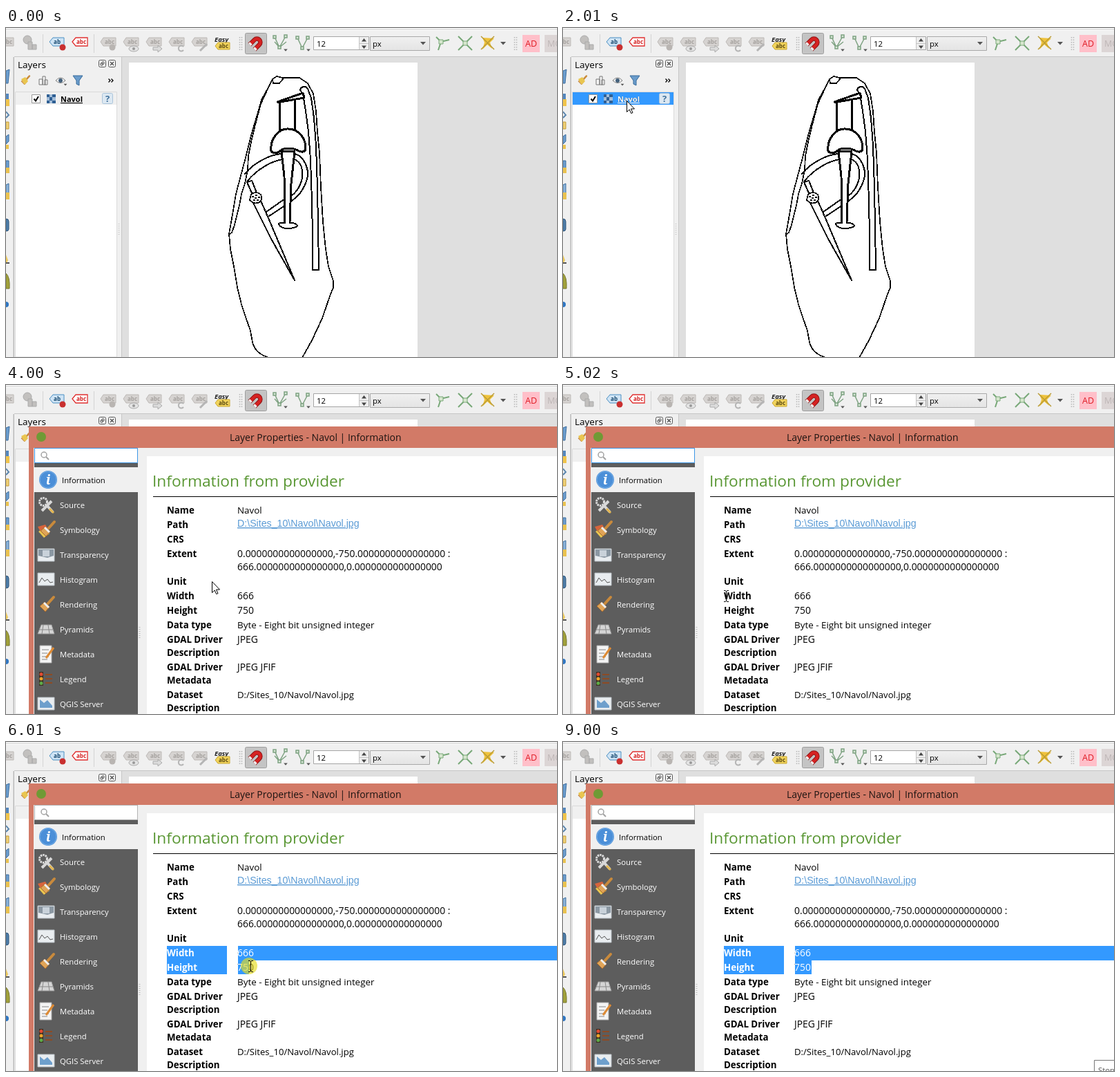
An HTML page that plays this animation: 798 px wide and 476 px high, repeating every 10000 ms.

```html
<!DOCTYPE html>
<html lang="en">
<head>
<meta charset="utf-8">
<title>Layer properties</title>
<style>
html, body { margin: 0; width: 100%; height: 100%; overflow: hidden; background: #f0f0f0; }
svg { display: block; width: 798px; height: 476px; }
text { font-family: "Open Sans", "Noto Sans", sans-serif; white-space: pre; }
.ui { font-size: 11.3px; }
.val { font-size: 13.4px; }
.num { font-size: 13.9px; }
.path { font-size: 13.1px; }
.key { font-size: 13.3px; font-weight: 700; }
.link { font: 14.2px "Liberation Sans", Arial, sans-serif; fill: #5b9bd5; text-decoration: underline; }
.tag { font: 700 8px "Open Sans", sans-serif; text-anchor: middle; }
.name { font-size: 11px; font-weight: 700; text-decoration: underline; }
.line { fill: none; stroke: #000; stroke-width: 1.7; stroke-linejoin: round; stroke-linecap: round; }
.mid { stroke-width: 2; }
.bold { stroke-width: 3; }

.step { opacity: 0; animation: 10s step-end infinite; }
#arrow { animation-name: arrow; }
#beam { animation-name: beam; }
#halo { animation-name: halo; }
#caret { animation-name: caret; }
.row { animation-name: row; }
#dialog { animation-name: dialog; }
#focus { animation-name: focus; }
#pick1 { animation-name: pick1; }
#pick2 { animation-name: pick2; }
#pick3 { animation-name: pick3; }
#tip { animation-name: tip; }

@keyframes arrow {
  0%, 25%, 50.2%, 75%, 100% { opacity: 0; transform: translate(0, 0); }
  5% { opacity: 1; transform: translate(159px, 150px); }
  10% { opacity: 1; transform: translate(93px, 105px); }
  14.9% { opacity: 1; transform: translate(92px, 105px); }
  35% { opacity: 1; transform: translate(130px, 137px); }
  40% { opacity: 1; transform: translate(298px, 284px); }
  45% { opacity: 1; transform: translate(231px, 306px); }
  70% { opacity: 1; transform: translate(451px, 407px); }
}
@keyframes beam {
  0%, 35%, 70%, 100% { opacity: 0; transform: translate(0, 0); }
  25% { opacity: 1; transform: translate(94px, 105px); }
  50.2% { opacity: 1; transform: translate(236px, 305px); }
  55.1% { opacity: 1; transform: translate(266px, 306px); }
  60.1% { opacity: 1; transform: translate(354px, 324px); }
  65% { opacity: 1; transform: translate(369px, 328px); }
}
@keyframes halo {
  0%, 20.1%, 70%, 100% { opacity: 0; transform: translate(0, 0); }
  14.9% { opacity: .65; transform: translate(92px, 105px); }
  55.1% { opacity: .65; transform: translate(263px, 305px); }
  60.1% { opacity: .65; transform: translate(352px, 324px); }
  65% { opacity: .65; transform: translate(369px, 328px); }
}
@keyframes caret { 0%, 30%, 40%, 50.2%, 100% { opacity: 0; } 25%, 35%, 45% { opacity: 1; } }
@keyframes row { 0%, 25%, 100% { opacity: 0; } 14.9% { opacity: 1; } }
@keyframes dialog { 0% { opacity: 0; } 25%, 100% { opacity: 1; } }
@keyframes focus { 0%, 55.1%, 100% { opacity: 0; } 25% { opacity: 1; } }
@keyframes pick1 { 0%, 60.1%, 100% { opacity: 0; } 55.1% { opacity: 1; } }
@keyframes pick2 { 0%, 65%, 100% { opacity: 0; } 60.1% { opacity: 1; } }
@keyframes pick3 { 0% { opacity: 0; } 65%, 100% { opacity: 1; } }
@keyframes tip { 0% { opacity: 0; } 90%, 100% { opacity: 1; } }
</style>
</head>
<body>
<svg viewBox="0 0 798 476" xmlns="http://www.w3.org/2000/svg">
  <defs>
    <linearGradient id="sheen" x2="0" y2="1">
      <stop stop-color="#f0f0f0"/><stop offset="1" stop-color="#e4e4e4"/>
    </linearGradient>
    <g id="label">
      <path d="M-11 0L-7-6H11V6H-7Z" fill="#d6d3d1" stroke="#bdb9b6"/>
      <text class="tag" x="2" y="3" fill="#a5a19e">abc</text>
    </g>
    <path id="grip" d="M-1.5 13V33M1.5 13V33" stroke="#b5b5b5" stroke-width="1.5" stroke-dasharray="1.5 2"/>
    <path id="down" d="M-4-2H4L0 2.5Z" fill="#555"/>
    <g id="size">
      <text class="key" x="233" y="310">Width</text>
      <text class="num" x="335" y="310">666</text>
      <text class="key" x="233" y="331">Height</text>
      <text class="num" x="335" y="331">750</text>
    </g>
    <g id="picked" fill="#fff">
      <path d="M233 295H798V336H233Z" fill="#3399ff"/>
      <use href="#size"/>
    </g>
    <g id="brush">
      <path d="M10-11L1-1" stroke="#c98a3c" stroke-width="4" stroke-linecap="round"/>
      <path d="M-3-4L4 3L-2 10L-10 2Z" fill="#e0a458" stroke="#a8682a"/>
      <path d="M-4-3L3 4" stroke="#eee" stroke-width="3"/>
    </g>
    <path id="picture" d="M-12-9H12V9H-12Z" fill="#e9edf0" stroke="#b9c0c6"/>
    <clipPath id="clip1"><path d="M233 295H267V315H233Z"/></clipPath>
    <clipPath id="clip2"><path d="M233 295H320V336H233ZM336 295H798V316H336ZM336 316H352V336H336Z"/></clipPath>
    <clipPath id="clip3"><path d="M233 295H320V336H233ZM336 295H798V316H336ZM336 316H360V336H336Z"/></clipPath>
  </defs>

  <!-- main window -->
  <path d="M0 0H798V476H0Z" fill="#f0f0f0"/>
  <path d="M0 2.5H798" stroke="#d9d9d9"/>
  <path d="M0 3.5H798" stroke="#fff"/>
  <path d="M167 42H798V476H167Z" fill="#dfdfdf"/>
  <path d="M12 41.5H798M167.5 42V476" stroke="#c6c6c6" fill="none"/>
  <path d="M178 50H596V476H178Z" fill="#fff"/>

  <!-- toolbar -->
  <use href="#label" x="0" y="20"/>
  <g fill="#c2c0be" stroke="#aaa">
    <circle cx="31" cy="17" r="6"/><path d="M32 20H38V31H32ZM38 24H44V31H38Z"/>
  </g>
  <path d="M53.5 9V36M127.5 9V36" stroke="#d4d4d4"/>
  <path d="M63 20L68 14H84V26H68Z" fill="#cfe4f5" stroke="#4a8fc2"/>
  <text class="tag" x="74" y="23" fill="#16486f">ab</text>
  <circle cx="82" cy="28" r="4.5" fill="#c93030"/>
  <path d="M96 20L101 14H118V26H101Z" fill="#fff" stroke="#e03030" stroke-width="1.3"/>
  <text class="tag" x="109" y="23" fill="#d42020">abc</text>
  <use href="#label" x="148" y="20"/><circle cx="154" cy="28" r="4.5" fill="#b9b5b2"/>
  <use href="#label" x="181" y="20"/><ellipse cx="185" cy="30" rx="7" ry="4" fill="#e3e3e3" stroke="#aaa"/><circle cx="185" cy="30" r="2" fill="#999"/>
  <use href="#label" x="214" y="20"/><path d="M213 28H220V25L226 30L220 35V32H213Z" fill="#ddd" stroke="#aaa"/>
  <use href="#label" x="247" y="20"/><path d="M257 27A4 4 0 1 0 257 32" fill="none" stroke="#b5b5b5" stroke-width="2"/>
  <use href="#label" x="280" y="20"/><path d="M281 33L291 23" stroke="#b5b5b5" stroke-width="3"/>
  <text x="302" y="20" font-size="9.5" font-weight="700" font-style="italic" fill="#222">Easy</text>
  <path d="M303 26L307 21H324V31H307Z" fill="#f2d45c" stroke="#c9a72e"/>
  <text class="tag" x="315" y="29" fill="#5c4a10">abc</text>
  <use href="#grip" x="340"/>
  <rect x="346.5" y="7.5" width="31" height="30" rx="2" fill="#c4c4c4" stroke="#9d9d9d"/>
  <g transform="translate(362 22) rotate(225)" fill="none">
    <path d="M-5-8V2A5 5 0 0 0 5 2V-8" stroke="#8f1616" stroke-width="6.5"/>
    <path d="M-5-7V2A5 5 0 0 0 5 2V-7" stroke="#d62222" stroke-width="4.5"/>
    <path d="M-5-8V-5M5-8V-5" stroke="#eee" stroke-width="5"/>
  </g>
  <g fill="none" stroke="#7fa383" stroke-width="1.5">
    <path d="M389 13L396 28L405 12M389 20L396 28L406 20M422 14L429 29L437 14"/>
    <path d="M387 11H391V15H387ZM394 26H398V30H394ZM403 10H407V14H403ZM420 12H424V16H420ZM427 27H431V31H427ZM435 12H439V16H435Z" fill="#d8e7d7"/>
  </g>
  <use href="#down" transform="translate(405 32) scale(.7)"/>
  <use href="#down" transform="translate(438 32) scale(.7)"/>
  <path d="M445.5 12.5H525.5V31.5H445.5Z" fill="#fff" stroke="#a5a5a5"/>
  <path d="M512 13H525V31H512Z" fill="#eee"/>
  <path d="M511.5 13V31M512 22.5H525" stroke="#c4c4c4"/>
  <path d="M515 19.5L518.5 15L522 19.5ZM515 25.5L518.5 30L522 25.5Z" fill="#444"/>
  <text class="ui" x="450" y="27">12</text>
  <path d="M527.5 12.5H613.5V32.5H527.5Z" fill="url(#sheen)" stroke="#a8a8a8"/>
  <text class="ui" x="531" y="27">px</text>
  <use href="#down" x="604" y="22"/>
  <g fill="none" stroke="#78a878" stroke-width="2">
    <path d="M623 13L630 20L642 17M630 20L626 32"/>
    <path d="M655 12L675 32M675 12L655 32"/>
  </g>
  <path d="M627 17H633V23H627ZM662 19H668V25H662Z" fill="#d6e6cd" stroke="#78a878"/>
  <path d="M690 14L707 15L701 21L704 30L697 24L690 31L693 21Z" fill="#efc23b"/>
  <path d="M688 12L707 31M707 12L688 31" stroke="#b99b35" stroke-width="1.5"/>
  <use href="#down" x="720" y="22"/>
  <use href="#grip" x="738"/>
  <path d="M748 10H773V35H748Z" fill="#ffbfc9"/>
  <text x="760.5" y="27" font-size="12.5" text-anchor="middle" fill="#e01b24">AD</text>
  <path d="M780 10H798V35H780Z" fill="#dcd5d5"/>
  <text x="784" y="27" font-size="12.5" fill="#bdb5b5">MC</text>

  <!-- clipped tool strip -->
  <path d="M0 62L5 60L3 80H0Z" fill="#6d9fd0" stroke="#3b6c9e"/>
  <path d="M0 95H4V113H0Z" fill="#5487bd"/><path d="M0 103H5V113H0Z" fill="#f0c44c"/>
  <path d="M0 121L4 126L0 130" fill="none" stroke="#5b86ae" stroke-width="2"/>
  <path d="M0 136H4V146H0Z" fill="#f0d27a" stroke="#c59b35"/>
  <path d="M0 157L4 154V164L0 168Z" fill="#6e9fd0" stroke="#3b6c9e"/><path d="M0 169H4V175H0Z" fill="#eac250"/>
  <path d="M0 192H4V206H0Z" fill="#6e9fd0" stroke="#3b6c9e"/><path d="M0 202H5V210H0Z" fill="#eac250"/>
  <path d="M0 227L4 225V247H0Z" fill="#8fb6dc" stroke="#3b6c9e"/><path d="M0 238H5V248H0Z" fill="#eac250"/>
  <path d="M0 276Q4 276 4 280V291Q4 294 0 294Z" fill="#4f7ea9" stroke="#2f567c"/>
  <path d="M0 328L3 336L0 342Z" fill="#ecc95d"/><path d="M0 340H5" stroke="#555" stroke-width="2"/>
  <path d="M0 355Q6 360 5 377H0Z" fill="#a2a23b" stroke="#77772a"/>
  <circle cx="0" cy="400" r="4" fill="#2f76c2"/>
  <path d="M10.5 42V476" stroke="#d2d2d2"/>
  <path d="M11.5 42V476" stroke="#bcbcbc"/>
  <path d="M163.5 283V300" stroke="#ccc" stroke-width="2" stroke-dasharray="1 2"/>

  <!-- layers panel -->
  <text x="17" y="58" font-size="13.5">Layers</text>
  <g fill="#f6f6f6" stroke="#555">
    <rect x="134.5" y="46.5" width="10" height="10" rx="2"/><rect x="148.5" y="46.5" width="10" height="10" rx="2"/>
    <path d="M139 49H142V52H139ZM137 51H140V54H137Z"/>
    <path d="M151 49L156 54M156 49L151 54" stroke-width="1.5"/>
  </g>
  <g transform="translate(28 76) scale(.6)"><use href="#brush"/></g>
  <path d="M22 74L28 71L32 77L27 82Z" fill="#e9c650"/>
  <path d="M48 74H53V82H48ZM53 70H57V82H53ZM56 75H60V82H56Z" fill="#f4f4f4" stroke="#777"/>
  <path d="M72 76Q79 68 86 76Q79 83 72 76Z" fill="#fff" stroke="#777"/>
  <circle cx="79" cy="76" r="3" fill="#44617c"/>
  <use href="#down" transform="translate(86 82) scale(.6)"/>
  <path d="M97 69H111L106 76V83L102 81V76Z" fill="#6a9ccb" stroke="#376a9a"/>
  <path d="M148.5 73.5L151 76L148.5 78.5M152.5 73.5L155 76L152.5 78.5" fill="none" stroke="#000" stroke-width="1.3"/>
  <path d="M13.5 92.5H160.5V476H13.5Z" fill="#fff" stroke="#dadada"/>
  <path d="M14 93H160V111H14Z" fill="#f0f0f0"/>
  <path class="step row" d="M14 93H160V111H14Z" fill="#3399ff"/>
  <path d="M37.5 96.5H49.5V108.5H37.5Z" fill="#fff" stroke="#999"/>
  <path d="M40.5 102.5L43 105.5L47 99" fill="none" stroke="#000" stroke-width="2"/>
  <path d="M59 96H72V109H59Z" fill="#a3bdd8"/>
  <path d="M59 96H63V100H59ZM67 96H72V100H67ZM63 100H67V105H63ZM59 105H63V109H59ZM67 105H72V109H67Z" fill="#2f5f94"/>
  <rect x="139.5" y="94.5" width="15" height="15" rx="2" fill="#dce8f2" stroke="#a9c3da"/>
  <text x="147" y="107" font-size="13" font-weight="700" text-anchor="middle" fill="#41719c">?</text>
  <text class="name" x="79" y="107">Navol</text>
  <g class="step row"><text class="name" x="79" y="107" fill="#fff">Navol</text></g>

  <!-- engraved slab -->
  <g class="line" shape-rendering="crispEdges">
    <path d="M378 476Q361 470 357 455L354 438L347 418L341 400L335 375L330 345L325 320L323 298L328 270L333 240L341 210L349 180L356 152L364 125L370 104L381 84L386 74L392 70L400 72L425 72L437 80L445 95L449 120L451 150L454 180L456 230L459 280L463 320L467 345L474 366V376L470 385L458 420L443 452L429 477"/>
    <path d="M386 75L387 80L396 80L401 74M381 84L369 110L361 140L355 165L351 185L350 205L346 225L341 240L338 257L334 272L331 285L327 296L323 299"/>
    <path class="mid" d="M426 90Q427 85 432 85Q437 85 438 91L442 101L446 130L449 170L451 230L453 345V350H444V300L443 250L441 190L438 150L434 120L430 95Z"/>
    <path class="mid" d="M346 211C361 193 384 183 399 182M350 221C364 204 384 193 400 190M418 182C432 185 438 204 437 214C433 234 421 246 412 251M418 190C427 194 431 205 429 217C426 231 418 240 413 243M404 247L377 266M404 257L381 272"/>
    <path class="mid" d="M349 223L356 221L363 238L357 241ZM358 253L369 250L383 282L418 365L384 305Z"/>
    <path d="M355 241Q362 235 369 241Q372 248 367 252Q360 256 353 249Z" fill="#fff"/>
    <path d="M357 244H358M362 242H363M366 245H367M359 249H360M364 249H365M361 246H362"/>
    <g class="bold">
      <path d="M393 107L430 94L432 101L397 107ZM397 108L396 148M418 104L419 147"/>
      <path d="M384 178C382 160 395 145 409 146C424 146 435 160 434 176Q431 181 424 178Q418 174 409 174Q400 174 396 179Q388 183 384 178Z" fill="#fff"/>
      <path d="M399 179L403 215L404 281M418 179L413 225L411 281M399 178H418"/>
    </g>
    <path class="mid" d="M404 282Q395 281 395 284Q398 290 408 290Q419 290 422 286Q421 282 411 282"/>
  </g>

  <!-- properties dialog -->
  <g id="dialog" class="step">
    <path d="M33 60H798V476H33Z" fill="#d27a67"/>
    <circle cx="51" cy="75" r="7" fill="#6f9a35"/>
    <text x="324" y="81" font-size="14" fill="#1d1412">Layer Properties - Navol | Information</text>
    <path d="M40 91H798V476H40Z" fill="#f0f0f0"/>
    <path d="M41 91H191V476H41Z" fill="#5d5d5d"/>
    <path d="M41.5 91.5H190.5V112.5H41.5Z" fill="#fff" stroke="#b4b4b4"/>
    <path id="focus" class="step" d="M41.5 91.5H190.5V112.5H41.5Z" fill="none" stroke="#3c96e6"/>
    <circle cx="55" cy="101" r="4" fill="none" stroke="#a3a3a3" stroke-width="1.5"/>
    <path d="M58 104L62 108" stroke="#a3a3a3" stroke-width="2"/>
    <path id="caret" class="step" d="M70 96H71V109H70Z"/>
    <path d="M41 119H191V155H41Z" fill="#f0f0f0"/>
    <path d="M193.5 350V367" stroke="#bbb" stroke-width="2" stroke-dasharray="1 2"/>

    <circle cx="61" cy="137" r="13" fill="#4b8fd8"/>
    <circle cx="61" cy="137" r="12" fill="none" stroke="#79b0e6"/>
    <text x="61" y="144" text-anchor="middle" style="font:italic 700 19px 'Noto Serif',serif" fill="#fff">i</text>
    <circle cx="54" cy="169" r="5.5" fill="none" stroke="#ddd" stroke-width="3" stroke-dasharray="2.5 1"/>
    <path d="M52 182L66 168M59 174L68 184" stroke="#d8d8d8" stroke-width="4"/>
    <path d="M63 179L69 185" stroke="#e2b54e" stroke-width="3"/>
    <path d="M46 205L57 202L63 212L54 220Z" fill="#d8643c"/>
    <path d="M47 212L56 207L63 215L55 221Z" fill="#eac650"/>
    <use href="#brush" x="60" y="209"/>
    <use href="#picture" x="58" y="246"/>
    <path d="M47 238H69V247L60 250L47 247Z" fill="#8b98a3"/><path d="M53 239H63V248H53Z" fill="#c9d2da"/>
    <use href="#picture" x="58" y="281"/>
    <path d="M48 286L52 279L56 284L60 281L64 286L68 285" fill="none" stroke="#555"/>
    <use href="#brush" x="59" y="318"/>
    <path d="M46 360L51 347H66L70 360Z" fill="#d5d5d5" stroke="#999"/>
    <path d="M54 347L52 360M61 347L63 360M48 354H68" stroke="#888"/>
    <path d="M49 377H66V402H49Z" fill="#f4f4f4" stroke="#aaa"/>
    <path d="M52 383H62M52 388H60M52 393H62M52 397H60" stroke="#888"/>
    <path d="M58 395L69 380" stroke="#dd8b35" stroke-width="3"/>
    <path d="M48 415H54V435H48Z" fill="#3d3023"/>
    <circle cx="51" cy="418.5" r="2.5" fill="#e24b32"/><circle cx="51" cy="425" r="2.5" fill="#eda42c"/><circle cx="51" cy="431.5" r="2.5" fill="#5dab48"/>
    <path d="M57 419H67M57 425H67M57 431H67" stroke="#8d4b25" stroke-width="2"/>
    <use href="#picture" x="58" y="461"/>
    <path d="M49 455L55 460L60 456L67 464V467H49Z" fill="#6e9fcc"/>

    <text class="ui" x="81" y="142">Information</text>
    <g class="ui" fill="#fff">
      <text x="78" y="178">Source</text>
      <text x="78" y="214">Symbology</text>
      <text x="78" y="250">Transparency</text>
      <text x="78" y="286">Histogram</text>
      <text x="78" y="322">Rendering</text>
      <text x="78" y="358">Pyramids</text>
      <text x="78" y="394">Metadata</text>
      <text x="78" y="430">Legend</text>
      <text x="78" y="466">QGIS Server</text>
    </g>

    <path d="M204 103H798V476H204Z" fill="#fff"/>
    <text x="212" y="147" font-size="22.7" fill="#589632">Information from provider</text>
    <path d="M213 161.5H798" stroke="#000"/>
    <g class="key">
      <text x="233" y="186">Name</text>
      <text x="233" y="207">Path</text>
      <text x="233" y="228">CRS</text>
      <text x="233" y="249">Extent</text>
      <text x="233" y="289">Unit</text>
      <text x="233" y="352">Data type</text>
      <text x="233" y="373">GDAL Driver</text>
      <text x="233" y="392">Description</text>
      <text x="233" y="413">GDAL Driver</text>
      <text x="233" y="432">Metadata</text>
      <text x="233" y="453">Dataset</text>
      <text x="233" y="472">Description</text>
    </g>
    <text class="val" x="335" y="186">Navol</text>
    <text class="link" x="335" y="205">D:\Sites_10\Navol\Navol.jpg</text>
    <text class="num" x="335" y="249">0.0000000000000000,-750.0000000000000000 :</text>
    <text class="num" x="335" y="268">666.0000000000000000,0.0000000000000000</text>
    <text class="val" x="335" y="352">Byte - Eight bit unsigned integer</text>
    <text class="num" x="335" y="373">JPEG</text>
    <text class="num" x="335" y="413">JPEG JFIF</text>
    <text class="path" x="335" y="453">D:/Sites_10/Navol/Navol.jpg</text>
    <use href="#size"/>

    <g id="pick1" class="step"><g clip-path="url(#clip1)"><use href="#picked"/></g></g>
    <g id="pick2" class="step"><g clip-path="url(#clip2)"><use href="#picked"/></g></g>
    <g id="pick3" class="step"><g clip-path="url(#clip3)"><use href="#picked"/></g></g>
  </g>

  <g id="tip" class="step">
    <path d="M769.5 460.5H800V480H769.5Z" fill="#fff" stroke="#767676"/>
    <text class="ui" x="775" y="479" fill="#575757">Stop</text>
  </g>

  <!-- pointer -->
  <circle id="halo" class="step" r="12" fill="#e6dc1e"/>
  <path id="arrow" class="step" d="M.5 .5V16.5L4.2 13L6.7 18.5L9 17.5L6.5 12H11.5Z" fill="#fff" stroke="#000"/>
  <path id="beam" class="step" d="M-3-7.5H-1L.5-6.5L2-7.5H4M.5-6.5V7.5M-3 8.5H-1L.5 7.5L2 8.5H4" fill="none" stroke="#000"/>
</svg>
</body>
</html>
```
